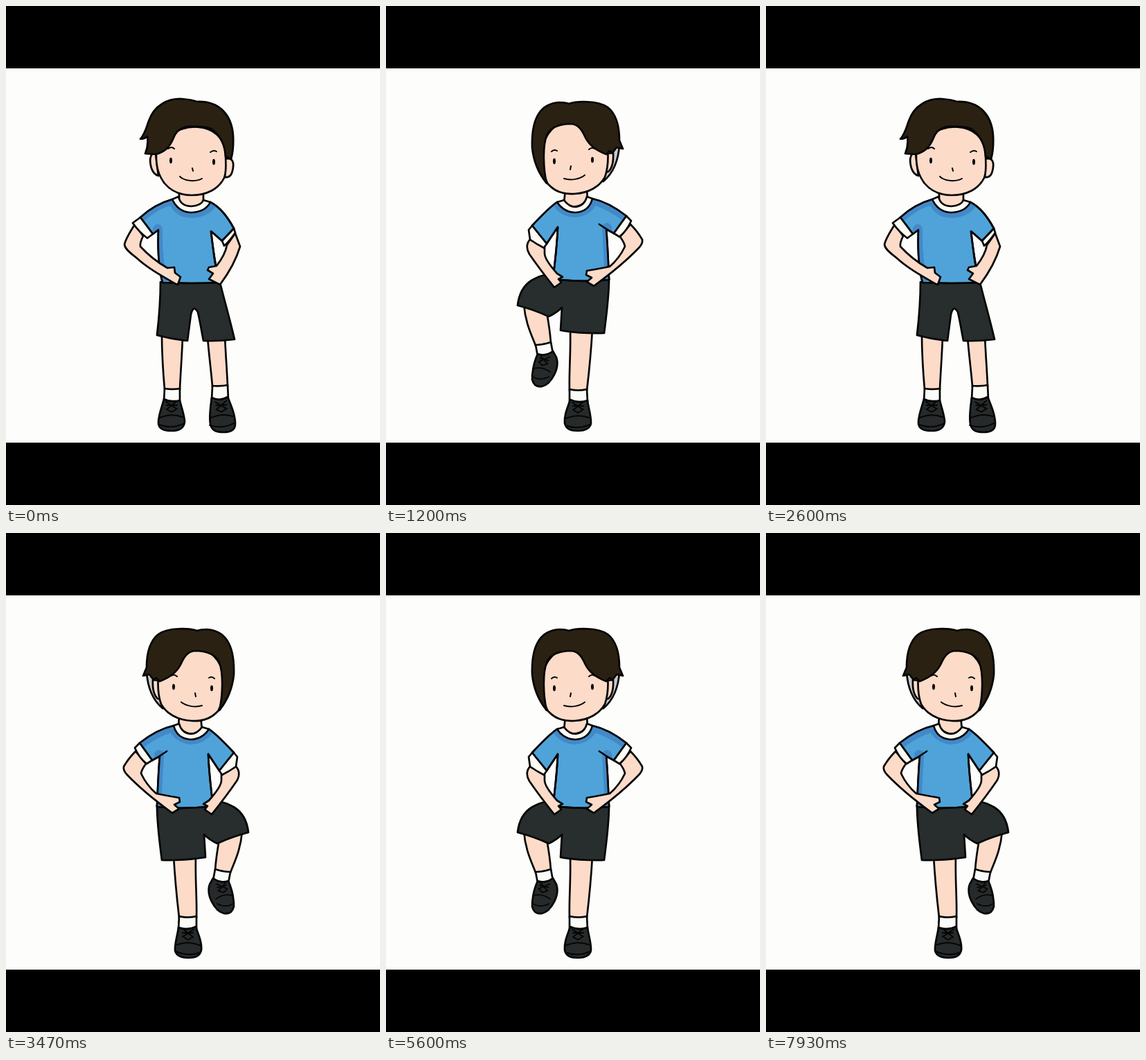
An HTML page that plays this animation: 540x720 px, repeating every 8 s.

```html
<!DOCTYPE html>
<html lang="en">
<head>
<meta charset="utf-8">
<title>Knee lifts</title>
<style>
  html, body { margin: 0; width: 100%; height: 100%; overflow: hidden; background: #000; }
  svg { display: block; width: 100vw; height: 100vh; }
  .pose { fill: none; stroke: #050505; stroke-width: 2.7; stroke-linecap: round; stroke-linejoin: round; }
  .skin { fill: #fcdbc9; }
  .hair { fill: #2a2112; }
  .shirt { fill: #4fa3d9; }
  .shade { stroke: #4389c8; stroke-width: 14; }
  .trim { fill: #fdfbf4; }
  .sock { fill: #fbfbf8; }
  .shorts { fill: #282d2d; }
  .shoe { fill: #262a2a; }
  .back { fill: #c8c8ca; }
  .dot { fill: #050505; stroke: none; }
  .thin { stroke-width: 2; }
</style>
</head>
<body>
<svg viewBox="0 0 540 720" preserveAspectRatio="none">
  <defs>
    <clipPath id="shirtFront"><path id="clipFront"/></clipPath>
    <clipPath id="shirtTurn"><path id="clipTurn"/></clipPath>
  </defs>
  <rect width="540" height="720" fill="#000"/>
  <rect y="90" width="540" height="540" fill="#fdfdfb"/>
  <g class="pose" id="front"></g>
  <g class="pose" id="liftLeft"></g>
  <g class="pose" id="liftRight" transform="matrix(-1 0 0 1 540 0)"></g>
</svg>
<script>
const HOLD = 1000;
const byId = id => document.getElementById(id);
const path = (cls, d) => `<path class="${cls}" d="${d}"/>`;
const eye = (x, y) => `<ellipse class="dot" cx="${x}" cy="${y}" rx="2" ry="4.2"/>`;
const shade = (clip, d) => `<g clip-path="url(#${clip})">${path('shade', d)}</g>`;

// Laces and toe cap, relative to the middle of the shoe opening.
const laces = (x, y, turn = 0) => `<g transform="translate(${x} ${y}) rotate(${turn})">` +
  path('thin', 'M-8 4L7 14M8 3L-7 15M-7 9H8M-7 15L0 19L8 14') +
  path('thin', 'M-17 27Q0 20 16 26M-18 37Q-1 44 17 36') + '</g>';

const frontShirt = 'M240 279C222 284 208 292 194 305L212 329L220 323C219 350 220 377 226 399' +
  'Q268 401 309 399C302 380 299 350 296 325L312 339L329 321C321 306 311 291 295 283Q268 308 240 279Z';

const turnShirt = 'M247 283C234 292 222 305 211 317L232 343L248 319C247 344 244 370 241 394' +
  'Q282 399 322 395C321 370 320 344 318 322L329 328L347 303C333 292 316 282 298 278Q276 308 247 283Z';

function drawFront() {
  return [
    // legs and shoes
    path('skin', 'M225 474C225 502 227 530 229 553L251 553C252 530 254 505 255 478Z'),
    path('skin', 'M291 478C293 503 296 525 298 549L320 549C319 525 317 500 316 476Z'),
    path('sock', 'M229 552Q240 554 251 552L251 570H228Z'),
    path('sock', 'M298 548Q309 549 320 547L321 568H297Z'),
    path('shoe', 'M228 567C225 579 220 590 220 601C220 610 228 613 239 613C251 613 258 608 258 599C257 588 253 578 251 569Q239 573 228 567Z'),
    laces(239, 567),
    path('shoe', 'M297 565C295 580 293 592 295 603C297 613 304 615 314 615C325 615 331 611 331 603C331 590 325 576 320 564Q309 571 297 565Z'),
    laces(310, 567, -3),
    path('shorts', 'M223 398L309 399C316 427 324 455 330 481Q307 484 285 483C282 468 280 454 277 442Q271 430 267 445L262 483Q240 481 218 475C221 449 223 424 223 398Z'),
    // shirt
    path('skin', 'M250 266V284Q267 296 285 283V266Z'),
    path('shirt', frontShirt),
    shade('shirtFront', 'M196 304Q221 283 241 280Q249 299 268 299Q287 298 297 286M219 322Q218 360 226 398'),
    `<path d="${frontShirt}"/>`,
    path('trim', 'M240 279L249 275Q252 289 268 289Q282 288 285 280L295 283Q288 297 268 298Q249 298 240 279Z'),
    // arms
    path('skin', 'M186 315C180 325 173 335 171 344C172 352 182 358 188 363C204 378 226 390 245 401L248 402L252 391L244 385L243 377L233 378C219 370 206 360 194 347Q193 342 198 332Z'),
    path('skin', 'M331 328L338 347C332 367 321 386 309 402L293 394L299 386L291 381L293 377L304 375C311 366 317 356 319 345Z'),
    path('trim', 'M194 305L183 313Q192 326 204 335L212 329Z'),
    path('trim', 'M329 321L331 327Q324 338 315 346L312 339Z'),
    // head
    path('skin', 'M216 212C207 212 207 224 210 234Q213 243 220 245Z'),
    path('skin', 'M316 221C325 218 329 223 328 232C327 242 324 248 316 247Z'),
    path('skin', 'M217 208C216 232 220 244 229 256C240 269 254 273 268 273C290 273 307 264 315 248C319 238 317 226 317 214C316 165 244 160 217 208Z'),
    path('hair', 'M194 192C201 184 203 174 206 166C214 143 234 133 254 134Q268 135 276 138C309 137 326 158 328 187Q329 207 325 221L317 217C316 202 310 188 299 179C291 173 274 174 262 174C251 176 245 182 242 190C236 205 228 211 216 214L201 213Q206 201 204 188Q200 192 194 192Z'),
    eye(238, 223), eye(300, 225),
    path('thin', 'M234 206Q239 202 243 206M295 211Q300 207 304 210M269 234L270 238M251 246C258 253 274 254 283 249')
  ].join('');
}

function drawTurn() {
  return [
    // raised leg
    path('skin', 'M199 430C201 456 209 472 216 490L238 486C237 472 235 458 232 442Z'),
    path('sock', 'M216 489Q227 489 238 485L241 501L219 505Z'),
    path('shoe', 'M219 502C214 513 211 526 211 539C213 547 218 550 225 549C234 547 239 540 243 532C248 522 248 513 246 507L241 498Q231 506 219 502Z'),
    `<g transform="translate(230 502) rotate(15) scale(.9)">` +
      path('thin', 'M-8 4L7 14M8 3L-7 15M-7 9H8M-7 15L0 19L8 14M-13 28Q0 20 15 26M-12 39Q1 46 15 34') + '</g>',
    // standing leg
    path('skin', 'M266 466C267 500 264 530 265 555L290 555C293 530 296 500 298 466Z'),
    path('sock', 'M265 553Q278 556 290 553L291 571H265Z'),
    path('shoe', 'M266 568C262 580 257 590 258 602C260 611 267 613 277 613C289 613 296 608 296 601C296 589 292 579 291 569Q278 574 266 568Z'),
    laces(277, 568),
    path('shorts', 'M241 393Q280 398 322 393C322 421 318 448 315 472Q284 473 252 468L254 435Q246 443 235 448Q213 438 190 432C192 414 199 403 210 396Q222 389 230 388Z'),
    // shirt
    path('skin', 'M259 264L257 284Q274 297 291 280L290 264Z'),
    path('shirt', turnShirt),
    shade('shirtTurn', 'M247 284Q257 298 274 298Q292 296 299 280Q324 287 347 305M319 320Q321 355 323 397'),
    `<path d="${turnShirt}"/>`,
    path('', 'M308 315L320 323'),
    path('trim', 'M247 283L257 280Q264 290 274 290Q287 288 290 275L298 278Q293 297 273 298Q256 297 247 283Z'),
    // arms
    path('skin', 'M208 337C203 342 202 350 207 358C218 374 231 391 243 406L253 399L249 394L255 391L247 386C239 377 229 365 229 357L229 348Z'),
    path('skin', 'M353 315Q363 325 370 337Q371 342 366 348C346 369 322 388 300 404L290 398L297 392L289 388L290 382L302 380L323 376Q337 364 345 347Q344 341 338 333Z'),
    path('trim', 'M211 317L206 323L208 337Q218 344 228 349L232 343Z'),
    path('trim', 'M347 303L354 310Q348 324 337 333L329 328Z'),
    // head
    path('back', 'M337 200Q335 235 314 253L312 205Z'),
    path('skin', 'M319 213L328 212Q329 232 321 239L316 240Z'),
    path('skin', 'M227 200C226 224 226 244 234 257C244 268 258 272 272 271C293 270 309 260 316 247Q322 230 320 206C302 150 241 153 227 200Z'),
    path('hair', 'M232 256C220 241 213 225 211 204C210 172 217 141 250 139Q259 139 264 141C275 137 306 136 320 146C334 157 337 178 337 194L342 206L333 204L327 212L323 209L318 214C302 208 293 200 288 190C283 179 278 170 265 170C246 171 236 177 232 187C226 202 227 235 232 256Z'),
    eye(243, 224), eye(298, 222),
    path('thin', 'M239 210Q243 206 247 209M293 207Q297 203 301 206M267 231L266 236M257 249C267 252 280 250 287 244')
  ].join('');
}

byId('clipFront').setAttribute('d', frontShirt);
byId('clipTurn').setAttribute('d', turnShirt);
byId('front').innerHTML = drawFront();
byId('liftLeft').innerHTML = byId('liftRight').innerHTML = drawTurn();

const poses = ['front', 'liftLeft', 'liftRight'].map(byId);
const order = [0, 1, 0, 2];
const start = performance.now();

function render(ms) {
  const active = order[Math.floor(ms / HOLD) % order.length];
  poses.forEach((pose, i) => { pose.style.display = i === active ? '' : 'none'; });
}

function tick() {
  render(performance.now() - start);
  requestAnimationFrame(tick);
}
tick();
</script>
</body>
</html>
```
